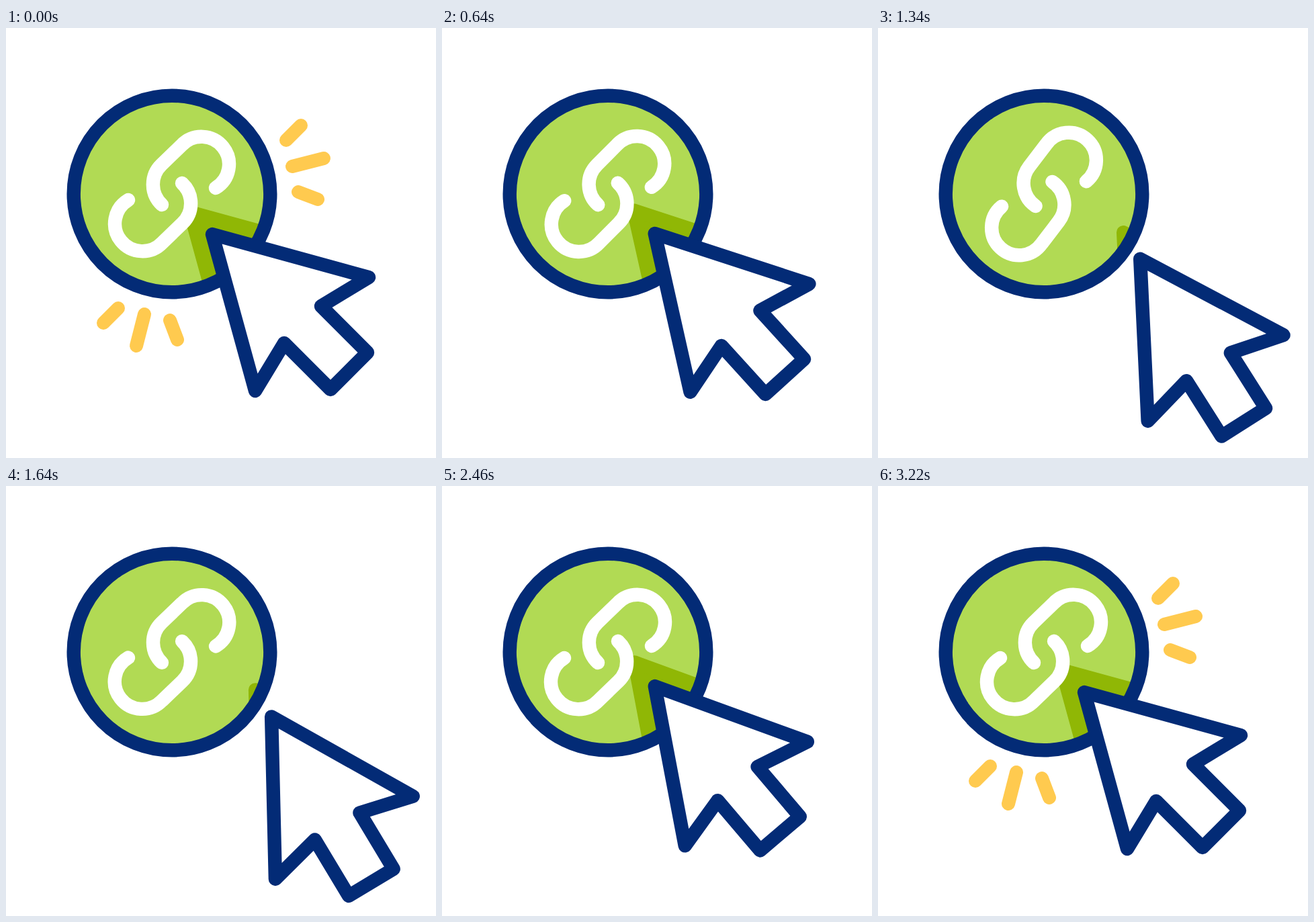
An HTML page for the animation above (3600 ms loop, 640x640 px).

```html
<!DOCTYPE html>
<html lang="en">
<head>
<meta charset="utf-8">
<title>Link click</title>
<style>
  html, body { margin: 0; width: 100%; height: 100%; overflow: hidden; background: #fff; }
  svg { display: block; width: 100vw; height: 100vh; }
  .line { fill: none; stroke-width: 20.4; stroke-linecap: round; stroke-linejoin: round; }
</style>
</head>
<body>
<svg viewBox="0 0 640 640">
  <defs>
    <clipPath id="disc"><circle cx="247" cy="247" r="140"/></clipPath>
    <path id="arrow" d="M307 307 540 371 469 414 538 483 483 538 414 469 371 540Z"/>
    <path id="half" d="M232 263A41 41 0 0 1 231.4 203.4L261.4 174.4A41 41 0 1 1 312 238"/>
  </defs>
  <g id="rays" class="line" stroke="#ffca4f"></g>
  <circle cx="247" cy="247" r="146" fill="#b1da54"/>
  <g clip-path="url(#disc)">
    <g id="shadow"><use href="#arrow" class="line" x="-33" y="-33" style="fill:#90b705" stroke="#90b705"/></g>
  </g>
  <g id="link" class="line" stroke="#fff">
    <use href="#half"/>
    <use href="#half" transform="rotate(180 247 247)"/>
  </g>
  <circle cx="247" cy="247" r="146.3" class="line" stroke="#032b76"/>
  <g id="cursor"><use href="#arrow" class="line" style="fill:#fff" stroke="#032b76"/></g>
</svg>
<script>
const LOOP = 3600;
const $ = id => document.getElementById(id);
const clamp = u => Math.min(1, Math.max(0, u));
const span = (t, from, to) => clamp((t - from) / (to - from));
const sine = u => (1 - Math.cos(Math.PI * u)) / 2;

// Quick departure, long soft landing: cubic-bezier(.33, 0, .2, 1)
function settle(u) {
  let lo = 0, hi = 1;
  for (let i = 0; i < 24; i++) {
    const s = (lo + hi) / 2, r = 1 - s;
    if (0.99 * r * r * s + 0.6 * r * s * s + s * s * s < u) lo = s; else hi = s;
  }
  return lo * lo * (3 - 2 * lo);
}

// Rays on the right, mirrored across the diagonal: inner end, then outer end
const rays = [[417, 167, 439, 145], [426, 206, 473, 194], [435, 244, 464, 255]]
  .flatMap(([a, b, c, d]) => [[a, b, c, d], [b, a, d, c]])
  .map(points => {
    const el = document.createElementNS('http://www.w3.org/2000/svg', 'path');
    $('rays').append(el);
    return { el, points };
  });

const swing = [[500, 0], [640, -1], [1040, 26.6], [1440, -14.5], [1840, 15], [2240, 0]];

function linkAngle(t) {
  for (let i = 1; i < swing.length; i++) {
    const [t0, a0] = swing[i - 1], [t1, a1] = swing[i];
    if (t < t1) return a0 + (a1 - a0) * sine(span(t, t0, t1));
  }
  return 0;
}

function draw(t) {
  const away = t < 1535
    ? sine(span(t, 465, 1505))
    : 1 - settle(span(t, 1560, 2440));
  const tilt = 14 * sine(1 - clamp(Math.abs(t - 1620) / 1380));
  const pose = `translate(${58.5 * away} ${63 * away}) rotate(${tilt} 423 423)`;
  $('cursor').setAttribute('transform', pose);
  $('shadow').setAttribute('transform', pose);
  $('link').setAttribute('transform', `rotate(${linkAngle(t)} 247 247)`);

  const grow = t < 1600 ? 1 - sine(span(t, 0, 480)) : sine(span(t, 2760, 3220));
  $('rays').style.display = grow > 0.001 ? '' : 'none';
  for (const { el, points: [a, b, c, d] } of rays) {
    el.setAttribute('d', `M${a} ${b}L${a + (c - a) * grow} ${b + (d - b) * grow}`);
    el.setAttribute('stroke-width', 20 * Math.min(1, grow * 4));
  }
}

const start = performance.now();
function tick() {
  draw((performance.now() - start) % LOOP);
  requestAnimationFrame(tick);
}
draw(0);
requestAnimationFrame(tick);
</script>
</body>
</html>
```
